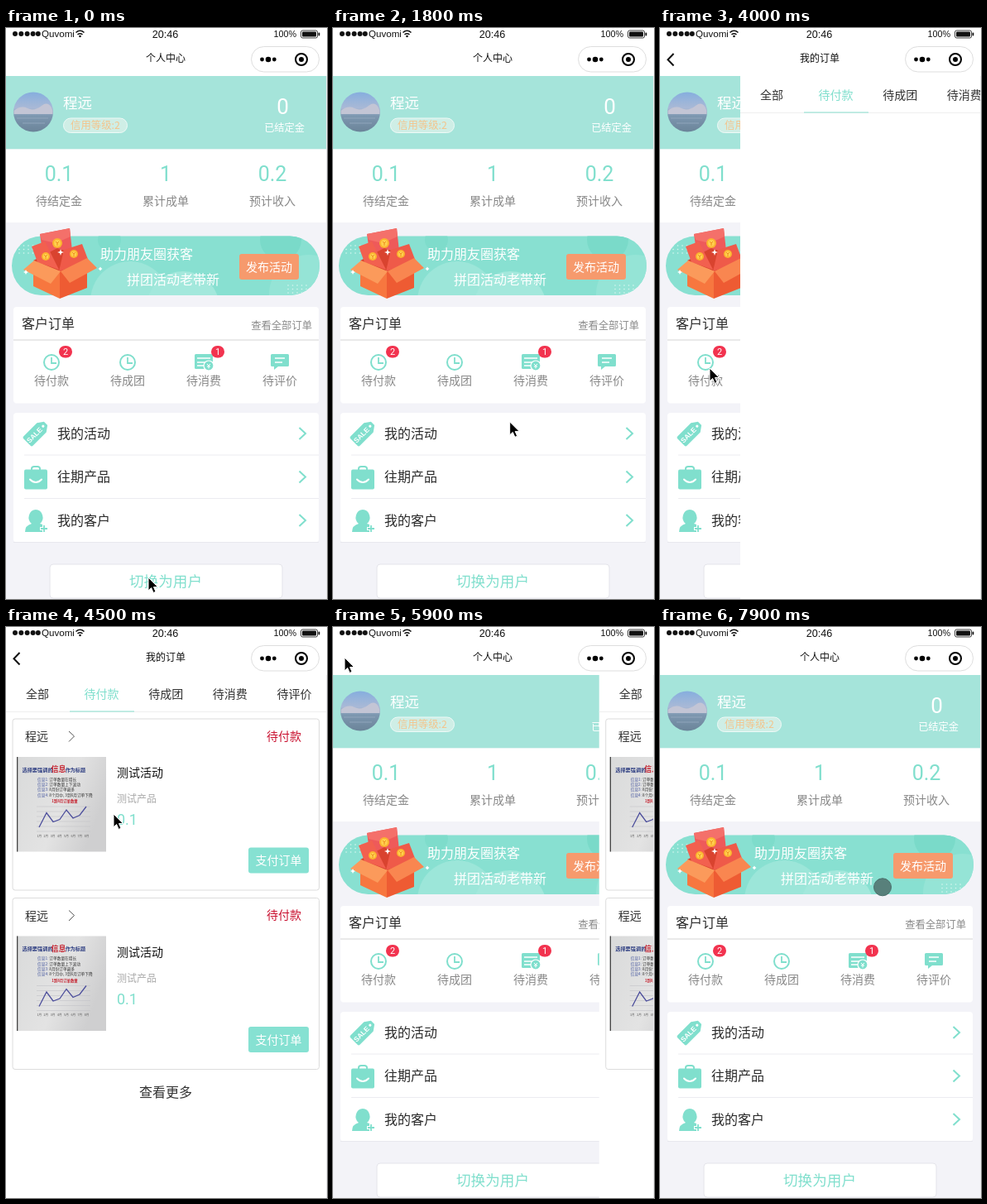
An HTML page for the animation above (8 s loop, 388 by 690 pixels).

```html
<!DOCTYPE html>
<html lang="zh-CN">
<head>
<meta charset="utf-8">
<title>个人中心</title>
<style>
html, body { margin: 0; width: 100%; height: 100%; overflow: hidden; background: #fff; }
svg { display: block; width: 100vw; height: 100vh; font-family: "Noto Sans CJK SC", "Noto Sans CJK", sans-serif; }
.num { font-family: Roboto, "Liberation Sans", sans-serif; }
.bar { font-family: "Liberation Sans", sans-serif; }
</style>
</head>
<body>
<svg id="stage" viewBox="0 0 388 690"></svg>
<script>
const TEAL = '#80dfcd', GREY = '#888', DARK = '#2b2b2b', USER = '程远';
const stage = document.getElementById('stage');

// Drawing helpers; text is placed by its visual centre line.
const text = (x, cy, str, size, fill, anchor = 'middle', extra = '') =>
  `<text x="${x}" y="${cy + size * 0.37}" font-size="${size}" fill="${fill}" text-anchor="${anchor}" ${extra}>${str}</text>`;
const num = (x, cy, str, size, fill, anchor) => text(x, cy, str, size, fill, anchor, 'class="num"');
const rect = (x, y, w, h, fill, rx = 0, extra = '') =>
  `<rect x="${x}" y="${y}" width="${w}" height="${h}" rx="${rx}" fill="${fill}" ${extra}/>`;
const circle = (x, y, r, fill, extra = '') => `<circle cx="${x}" cy="${y}" r="${r}" fill="${fill}" ${extra}/>`;
const line = (d, stroke, width = 1, extra = '') =>
  `<path d="${d}" fill="none" stroke="${stroke}" stroke-width="${width}" ${extra}/>`;
const shape = (d, fill, extra = '') => `<path d="${d}" fill="${fill}" ${extra}/>`;
const group = (x, y, body, extra = '') => `<g transform="translate(${x} ${y})" ${extra}>${body}</g>`;
const ROUND = 'stroke-linecap="round" stroke-linejoin="round"';

const clock = circle(0, 0, 9, 'none', `stroke="${TEAL}" stroke-width="2"`) + line('M0-6V1H6', TEAL, 1.8);
const voucher = rect(-11, -10, 22, 18, TEAL, 1.5) + line('M-8-5H8M-8 0H4M-8 4H1', '#fff', 1.6) +
  circle(6, 4, 6, TEAL, 'stroke="#fff" stroke-width="1.2"') + line('M4 2L6 4L8 2M6 4V7.500M4 5H8', '#fff', 1);
const bubble = shape('M-9.500-10H9.500Q11-10 11-8.500V3.500Q11 5 9.500 5H-2L-7 9V5H-9.500Q-11 5-11 3.500V-8.500Q-11-10-9.500-10Z', TEAL) +
  line('M-6-5H6M-6 0H3', '#fff', 1.6);
const badge = (x, n) => rect(x - 8, 384, 16, 14.5, '#f2334f', 7.2) + num(x, 391, n, 11, '#fff');

const tag = `<g transform="rotate(-45)">` +
  shape('M-15-6Q-15-8-13-8H10L17-3V3L10 8H-13Q-15 8-15 6Z', TEAL) + circle(12.5, 0, 1.6, '#fff') +
  text(-2.5, 0, 'SALE', 8.5, '#fff', 'middle', 'class="bar" font-weight="700"') + '</g>';
const bag = rect(-14, -9, 28, 24, TEAL, 2) + line('M-5-8V-10Q-5-12.500-2-12.500H2Q5-12.500 5-10V-8', TEAL, 2) +
  line('M-7 3Q0 10 7 3', '#fff', 2, ROUND);
const client = shape('M0-13A9 9.500 0 0 1 5 4Q11 5 11 8H8V14H-13Q-13 6-5 4A9 9.500 0 0 1 0-13Z', TEAL) +
  line('M10 5V15M5 10H15', '#fff', 4) + line('M10 6V14M6 10H14', TEAL, 1.8);
const foot = shape('M-5-4C2-9 14-8 14 0C14 6 9 5 9 10C9 15 1 16-1 11C-2 7 0 5-4 3C-8 1-8-2-5-4Z', TEAL) +
  circle(-7, -9, 3.6, TEAL) + circle(0, -11, 2.7, TEAL) + circle(5, -11.5, 2.3, TEAL) +
  circle(9.5, -10.5, 2, TEAL) + circle(-11, -3, 2, TEAL);
const adviser = shape('M0-13C9-13 8-2 3 2L4 4Q14 5 14 13H-14Q-14 5-4 4L-3 2C-8-2-9-13 0-13Z', TEAL) +
  shape('M-5 4L0 13L5 4L2 6H-2Z', '#fff') + shape('M-1.500 6H1.500L2 11L0 13L-2 11Z', TEAL);
const headset = line('M-10 0V-2A10 10 0 0 1 10-2V0M11 5Q10 12 3 12.500', TEAL, 2.4) +
  rect(-14, -2, 6, 10, TEAL, 3) + rect(8, -2, 6, 10, TEAL, 3) + rect(-2, 10.5, 6, 4, TEAL, 2);

// Orders card, menu and switch button, shared by both roles.
function lower(rows, label) {
  const states = [['待付款', clock], ['待成团', clock], ['待消费', voucher], ['待评价', bubble]];
  return rect(9, 337, 369, 116.5, '#fff', 4) +
    text(19, 357, '客户订单', 16, DARK, 'start', 'font-weight="500"') +
    text(370, 359, '查看全部订单', 12.3, GREY, 'end') + line('M9 377H378', '#d4d4d4') +
    states.map(([name, icon], i) => group(55 + 92 * i, 404, icon) + text(55 + 92 * i, 426, name, 14, GREY)).join('') +
    badge(72, 2) + badge(256, 1) +
    rect(9, 465, 369, 156.5, '#fff', 4) + line('M9 621.500H378', '#e8e8ee') +
    rows.map(([name, icon], i) => {
      const y = 490 + 52.5 * i;
      return group(36, y, icon) + text(62, y, name, 16, DARK, 'start') +
        line(`M354.500 ${y - 7}L362 ${y}L354.500 ${y + 7}`, TEAL, 2) +
        (i ? line(`M22 ${y - 26.5}H378`, '#ececf0') : '');
    }).join('') +
    rect(53, 648, 281, 41, '#fff', 4, 'stroke="#e4e4ea"') + text(193, 668, label, 17.6, TEAL);
}

const profile = rect(0, 58, 388, 632, '#f3f3f8') + rect(0, 58, 388, 88.5, '#a5e4da') +
  circle(33, 101.5, 24, 'url(#photo)') + shape('M9.500 100Q18 93 26 97T43 94T56.500 100V104H9.500Z', '#c3c5d5') +
  line('M13 109H51M20 115H47', '#8fa6bb', 1.2) +
  text(69, 91, USER, 17.5, '#fff', 'start') +
  rect(69.5, 109, 77, 17.5, '#cfeee6', 8.7, 'stroke="#eefaf7"') + text(108, 117.5, '信用等级:2', 12.4, '#f3c48c');

function dots(x, y) {
  let out = '';
  for (let i = 0; i < 15; i++) out += circle(x + i % 5 * 5.5, y + Math.floor(i / 5) * 4.5, 0.8, '#d9f6f0');
  return out;
}
const coin = (x, y, r) => circle(x, y, r, '#fbb32f') + circle(x, y, r * 0.65, '#ffd04e') +
  line(`M${x - 2} ${y - 2}L${x} ${y}L${x + 2} ${y - 2}M${x} ${y}V${y + 3}`, '#ef8e20', 1);
const spark = (x, y, r) => shape(`M${x} ${y - r}L${x + 1} ${y - 1}L${x + r} ${y}L${x + 1} ${y + 1}L${x} ${y + r}L${x - 1} ${y + 1}L${x - r} ${y}L${x - 1} ${y - 1}Z`, '#fff');
const gift = shape('M41 249L77 242L81 278L46 284Z', '#ee5a5a') + shape('M41 249L77 242L78 252L60 260L43 256Z', '#f4706a') +
  shape('M33 281L62 266L98 278L63 297Z', '#d9432f') + shape('M31 264L47 258L64 292L38 283Z', '#f2604f') +
  shape('M70 268L92 261L100 282L64 294Z', '#ef5a49') +
  coin(62, 260, 6) + coin(48, 276, 5) + coin(82, 273, 5) + spark(66, 271, 4) +
  shape('M33 283L65 294V327L33 312Z', '#f7773f') + shape('M65 294L98 283V314L65 327Z', '#ee5b33') +
  shape('M34 281L66 294L54 309L21 292Z', '#fb9a5b') + shape('M98 278L66 294L77 308L110 290Z', '#f98650');

const banner = `<clipPath id="pill">${rect(7, 251.5, 372, 71.5, '#fff', 35.7)}</clipPath><g clip-path="url(#pill)">` +
  rect(7, 251, 372, 73, '#88e0d1') + circle(150, 330, 48, '#9ce6d9') + circle(214, 338, 44, '#a3e8dc') +
  circle(332, 256, 25, '#7adac9') + circle(125, 256, 14, '#7edccb') + circle(366, 322, 48, '#95e4d6') +
  dots(16, 263) + dots(341, 311) + '</g>' + gift + spark(24, 295, 3) + spark(114, 291, 2.5) +
  text(170, 273, '助力朋友圈获客', 16, '#fff') + text(202, 304, '拼团活动老带新', 16, '#fff') +
  rect(282, 273, 72, 31, '#f69a6d', 3) + text(318, 289, '发布活动', 14, '#fff');

const stats = rect(0, 146.5, 388, 88.5, '#fff') +
  [['0.1', '待结定金'], ['1', '累计成单'], ['0.2', '预计收入']].map(([n, name], i) =>
    num(64 + 129 * i, 175.5, n, 25, TEAL) + text(64 + 129 * i, 209, name, 14, GREY)).join('') +
  num(334.5, 94, '0', 26, '#fff') + text(336.5, 120, '已结定金', 12.2, '#fff');

const seller = profile + stats + banner +
  lower([['我的活动', tag], ['往期产品', bag], ['我的客户', client]], '切换为用户');
const buyer = profile + group(0, -181.7,
  lower([['浏览历史', foot], ['历史咨询师', adviser], ['客服服务', headset]], '切换为咨询师'));

const notes = ['订单数量在增长', '订单数量上下波动', '8月份订单最多', '8个月中, 3到6月订单下降'];
const slide = rect(13, 157, 108, 114.5, 'url(#paper)') + rect(13, 157, 1.3, 114.5, '#444') +
  text(19.5, 172.5, '选择要强调的', 6.2, '#2c3c80', 'start', 'font-weight="700"') +
  text(63.5, 172, '信息', 9, '#c5222f', 'middle', 'font-weight="700"') +
  text(96, 172.5, '作为标题', 6.1, '#2c3c80', 'end', 'font-weight="700"') +
  notes.map((s, i) => text(38, 184 + 6.3 * i, `<tspan fill="#4a5ba0">信息${i + 1}:</tspan> ${s}`, 4.7, '#333', 'start')).join('') +
  text(71, 210.5, '1到8月订单数量', 4.4, '#c5222f', 'middle', 'font-weight="700"') +
  line('M37 217H102M37 223H102M37 229H102M37 235H102M37 241H102M37 247H102', '#c3c3c8', 0.6) +
  line('M40 242L49 224.500L57 235.500L65 232.500L73 221L81 231L89 227.500L97 217', '#4c4e9c', 1.3) +
  [1, 2, 3, 4, 5, 6, 7, 8].map(n => text(32 + n * 8.2, 252.5, n + '月', 3.6, '#555')).join('');

const order = rect(8, 111, 370.5, 207, '#fff', 3, 'stroke="#dcdcdc"') +
  text(23, 132, USER, 14, '#333', 'start') + line('M76 126L82.500 132L76 138.500', '#555') +
  text(357, 131.5, '待付款', 14, '#c9102f', 'end') + slide +
  text(134, 176, '测试活动', 14, '#111', 'start') + text(134, 208, '测试产品', 12, '#aaa', 'start') +
  num(134, 232.5, '0.1', 18, TEAL, 'start') +
  rect(293, 266.5, 73, 31, '#86e1d2', 3) + text(329.5, 282, '支付订单', 14, '#fff');

const orders = rect(0, 58, 388, 632, '#fff') + line('M0 102.500H388', '#efefef') + line('M77 102H155', '#8adfd0', 1.2) +
  ['全部', '待付款', '待成团', '待消费', '待评价'].map((s, i) =>
    text(38 + 77.6 * i, 80.5, s, 14, i === 1 ? TEAL : '#333')).join('') +
  `<g id="list">${order}${group(0, 216.5, order)}${text(193, 562, '查看更多', 16, '#333')}</g>`;

const chrome = rect(0, 0, 388, 58, '#fff') +
  [11, 18.3, 25.6, 32.6, 38.8].map(x => circle(x, 7, 3, '#111')).join('') +
  text(43, 7, 'Quvomi', 11.6, '#111', 'start', 'class="bar"') +
  line('M84.500 5.500Q89.500 1 94.500 5.500M86.500 8Q89.500 5.500 92.500 8', '#111', 1.6) + circle(89.5, 10, 1.3, '#111') +
  text(192.5, 7, '20:46', 12.6, '#111', 'middle', 'class="bar"') +
  text(351, 7.5, '100%', 10.8, '#111', 'end', 'class="bar"') +
  rect(356.5, 3, 20, 9, '#fff', 2, 'stroke="#111" stroke-width=".8"') + rect(358, 4.5, 17, 6, '#111', 1) +
  rect(377.5, 5.5, 1.8, 4, '#111', 1) +
  rect(296.5, 22.5, 82, 30.5, '#fff', 15.2, 'stroke="#dedede"') +
  circle(309.5, 38, 2.4, '#000') + circle(317, 38, 3.3, '#000') + circle(324.3, 38, 2.4, '#000') +
  circle(357, 38, 7, 'none', 'stroke="#000" stroke-width="2"') + circle(357, 38, 3, '#000') +
  text(193, 37, '个人中心', 12, '#111', 'middle', 'id="home"') +
  `<g id="back">${text(193, 37, '我的订单', 12, '#111')}${line('M16.500 31L9.500 38.300L16.500 45.500', '#111', 2)}</g>`;

stage.innerHTML = `<defs>
  <linearGradient id="photo" x2="0" y2="1"><stop stop-color="#86aede"/><stop offset=".4" stop-color="#a9b9d6"/><stop offset=".6" stop-color="#7d97b0"/><stop offset="1" stop-color="#6b8499"/></linearGradient>
  <linearGradient id="paper" x2="1" y2=".4"><stop stop-color="#d9dada"/><stop offset=".6" stop-color="#e3e3e3"/><stop offset="1" stop-color="#cfcfd0"/></linearGradient></defs>
  <g id="seller">${seller}</g><g id="buyer">${buyer}</g><g id="orders">${orders}</g>${chrome}
  ${line('M387.500 58V690', '#efeff1')}
  <g id="arrow">${shape('M0 0V15.800L3.600 12.500L6.200 18.400L9 17.200L6.500 11.500H11.500Z', '#000', 'stroke="#fff" stroke-width="1"')}</g>
  ${circle(269, 314.3, 10.5, '#58807b', 'id="touch" stroke="#4b6e6a"')}`;

const el = id => document.getElementById(id);
const show = (id, on) => el(id).setAttribute('visibility', on ? 'inherit' : 'hidden');
const move = (id, x, y) => el(id).setAttribute('transform', `translate(${x} ${y})`);

// Pointer path: time, x, y
const path = [
  [0, 172, 664], [600, 172, 664], [900, 209, 489], [1050, 209, 489], [1200, 205, 492], [1700, 205, 492],
  [2300, 322, 275], [2500, 312, 288], [3000, 312, 288], [3500, 51, 408], [3600, 60, 411], [4100, 60, 411],
  [4500, 130, 226], [4600, 131, 226], [4900, 61, 104], [5000, 61, 104], [5500, 10, 40], [5600, 14, 37],
  [6000, 14, 37], [6600, 106, 222], [6800, 106, 222], [7500, 269, 300], [8000, 269, 300]
];
function pointer(t) {
  const i = path.findIndex(p => p[0] > t);
  const [t0, x0, y0] = path[i - 1], [t1, x1, y1] = path[i];
  const u = (t - t0) / (t1 - t0), e = u * u * (3 - 2 * u);
  return [x0 + (x1 - x0) * e, y0 + (y1 - y0) * e];
}
const easeOut = (t, start, time) => 1 - (1 - Math.min(1, Math.max(0, (t - start) / time))) ** 2;

function draw(t) {
  const isBuyer = t >= 400 && t < 1500;
  const inOrders = t >= 3800 && t < 5800;
  const touching = t >= 7800;
  show('seller', !isBuyer);
  show('buyer', isBuyer);
  show('back', inOrders);
  show('home', !inOrders);
  show('list', t >= 4300);
  show('touch', touching);
  show('arrow', !touching);
  move('orders', 388 * (1 - easeOut(t, 3850, 300) + easeOut(t, 5724, 300)), 0);
  move('arrow', ...pointer(t));
}

function tick(now) {
  draw(Math.floor(now % 8000 / 100) * 100);
  requestAnimationFrame(tick);
}
draw(0);
requestAnimationFrame(tick);
</script>
</body>
</html>
```
